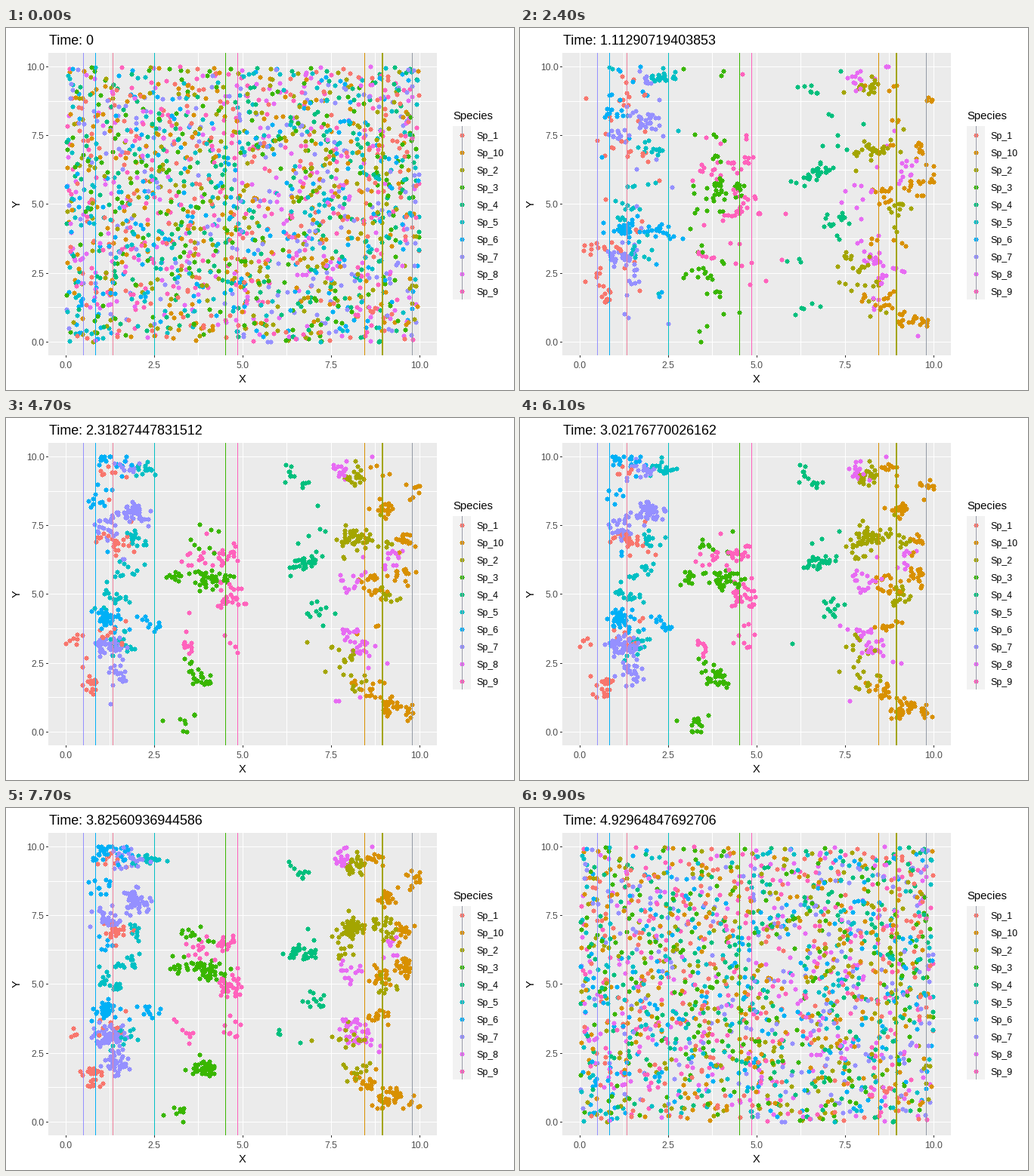
Write a matplotlib script that moves like this. It is 672 px wide and 480 px high and loops after 10 s.

```python
import numpy as np
import matplotlib.pyplot as plt
from matplotlib.animation import FuncAnimation
from matplotlib.patches import Rectangle

W, H, DPI, FRAMES = 672, 480, 96, 100
LEFT, RIGHT, TOP, BOTTOM = 56, 570, 33, 434

# name: (colour, niche centre, final count, hot spots)
SPECIES = {
    "Sp_1": ("#F8766D", 1.1, 75, [(.3, 3.1), (.7, 1.8), (1.15, 3.2), (1.2, 9.5), (1.35, 6.9)]),
    "Sp_10": ("#D89000", 9.1, 210, [(8.4, 1.5), (9.6, 5.7), (8.9, 5.3), (9.0, 8.1), (9.3, 7.0),
                                    (9.8, 8.8), (8.8, 9.5), (8.8, 3.8), (9.4, .9)]),
    "Sp_2": ("#A3A500", 8.3, 160, [(8.1, 1.8), (7.9, 6.2), (8.0, 7.0), (9.0, 7.1), (9.1, 5.0),
                                   (8.1, 3.0), (7.1, 3.1), (8.2, 9.5)]),
    "Sp_3": ("#39B600", 3.9, 125, [(3.7, 6.8), (4.1, 5.5), (3.3, 5.6), (3.2, .3), (3.8, 2.0)]),
    "Sp_4": ("#00BF7D", 6.7, 60, [(6.75, 6.2), (6.8, 7.0), (6.2, 3.0), (6.6, 9.1), (7.1, 4.5)]),
    "Sp_5": ("#00BFC4", 1.6, 85, [(1.3, 4.9), (1.9, 7.1), (1.7, 3.0), (1.9, 5.9), (2.4, 9.6)]),
    "Sp_6": ("#00B0F6", 1.5, 100, [(1.3, 9.9), (1.0, 8.6), (1.2, 4.1), (2.4, 3.9), (1.1, 6.5)]),
    "Sp_7": ("#9590FF", 1.5, 230, [(1.2, 3.1), (1.4, 2.1), (2.0, 7.9), (1.2, 7.2), (1.6, 9.5)]),
    "Sp_8": ("#E76BF3", 8.5, 90, [(7.9, 1.3), (8.0, 3.6), (8.2, 5.6), (7.8, 9.6), (9.2, 6.3),
                                  (8.6, 3.0)]),
    "Sp_9": ("#FF62BC", 4.5, 85, [(4.8, 3.5), (4.6, 6.5), (4.6, 5.0), (3.5, 6.2), (3.4, 3.4)]),
}
COLORS = np.array([s[0] for s in SPECIES.values()])
NICHE = np.array([s[1] for s in SPECIES.values()])
FINAL = np.array([s[2] for s in SPECIES.values()])
SPOTS = [np.array(s[3]) for s in SPECIES.values()]

# pixel column, width, colour
VLINES = [(102, 1, "#9590FF"), (118, 1, "#00B0F6"), (141, 1, "#EE7F9C"),
          (196, 1, "#00BFC4"), (290, 1, "#39B600"), (306, 1, "#FF62BC"),
          (474, 1, "#D89000"), (497, 2, "#A3A500"), (537, 1, "#959CA6")]

TIMES = np.interp(
    np.arange(FRAMES),
    [0, 1, 2, 3, 8, 24, 47, 61, 77, 99],
    [0, .000412873905116, .0506318274409, .0506318274409, .306832967568254,
     1.11290719403853, 2.31827447831512, 3.02176770026162,
     3.82560936944586, 4.92964847692706])


def px(x):
    return 79.3 + 46.77 * x


def py(y):
    return 416.2 - 36.45 * y


def heat(kind, pos):
    """Closeness of each point to its species' nearest hot spot, 0 to 1."""
    out = np.zeros(len(kind))
    for k, spots in enumerate(SPOTS):
        own = kind == k
        d2 = ((pos[own, None] - spots[None]) ** 2).sum(2).min(1)
        out[own] = np.exp(-d2 / .5)
    return out


def simulate():
    """Population (kind, position) for every step of the run."""
    rng = np.random.default_rng(12)
    kind = rng.permutation(np.repeat(np.arange(len(COLORS)), 205))
    pos = rng.uniform(0, 10, (len(kind), 2))
    states = [(kind, pos)]
    for n in range(1, FRAMES - 1):
        dt = TIMES[n] - TIMES[n - 1]
        if dt > 0:
            d = np.abs(pos[:, 0] - NICHE[kind])
            rate = .5 + .6 * d ** 4 + .9 * (1 - heat(kind, pos))
            alive = rng.random(len(kind)) < np.exp(-rate * dt)
            kind, pos = kind[alive], pos[alive]
            warm = heat(kind, pos) + .12
            goal = 68 + (FINAL - 68) * np.clip((n - 8) / 72, 0, 1.15)
            for k, spots in enumerate(SPOTS):
                own = np.flatnonzero(kind == k)
                births = max(0, int(goal[k]) - len(own))
                p = warm[own] / warm[own].sum()
                child = pos[rng.choice(own, births, p=p)] + rng.normal(0, .12, (births, 2))
                seeded = rng.random(births) < .2
                near = spots[rng.integers(len(spots), size=births)]
                near = near + rng.normal(0, .2, (births, 2))
                child[seeded] = near[seeded]
                kind = np.append(kind, np.full(births, k))
                pos = np.vstack([pos, np.clip(child, 0, 10)])
        states.append((kind, pos))
    states.append(states[0])
    return states


plt.rcParams["font.family"] = "Liberation Sans"
fig = plt.figure(figsize=(W / DPI, H / DPI), dpi=DPI, facecolor="white")
ax = fig.add_axes([0, 0, 1, 1])
ax.set_xlim(0, W)
ax.set_ylim(H, 0)
ax.axis("off")


def box(x, y, w, h, color, z=1):
    ax.add_patch(Rectangle((x, y), w, h, fc=color, lw=0, antialiased=False, zorder=z))


def label(x, y, text, pt, color="black", ha="center", **kw):
    kw.setdefault("va", "baseline")
    return ax.text(x, y, text, fontsize=pt, color=color, ha=ha, **kw)


def dots(xy, colors, z):
    return ax.scatter(*np.transpose(xy), s=(5.1 * 72 / DPI) ** 2, c=colors,
                      linewidths=0, antialiased=False, zorder=z)


def snap(pos):
    return np.floor(np.column_stack([px(pos[:, 0]), py(pos[:, 1])])) + .5


# panel, grid and axes
box(LEFT, TOP, RIGHT - LEFT, BOTTOM - TOP, "#EBEBEB")
for v in np.arange(0, 10.1, 1.25):
    box(int(px(v)), TOP, 1, BOTTOM - TOP, "white", 2)
    box(LEFT, int(py(v)), RIGHT - LEFT, 1, "white", 2)
for v in np.arange(0, 10.1, 2.5):
    box(int(px(v)), BOTTOM, 1, 3, "#333333")
    box(LEFT - 3, int(py(v)), 3, 1, "#333333")
    label(px(v), 451, f"{v:.1f}", 9.1, "#4D4D4D")
    label(50.5, py(v) + 4.5, f"{v:.1f}", 9.1, "#4D4D4D", "right")
for x, w, color in VLINES:
    box(x, TOP, w, BOTTOM - TOP, color, 5)
label(313, 470, "X", 11)
label(15, 233.5, "Y", 11, rotation=90, va="center")
title = label(57, 22, "", 13.4, ha="left")

# legend
label(591, 121, "Species", 11.2, ha="left")
box(591, 130, 24, 230, "#F2F2F2")
box(603, 130, 1, 230, "#9A9CAA", 5)
rows = 142.5 + 23 * np.arange(len(COLORS))
dots([(603.5, y) for y in rows], COLORS, 4)
for name, y in zip(SPECIES, rows):
    label(622, y + 4.5, name, 9.3, ha="left")

STATES = simulate()
points = dots(snap(STATES[0][1]), COLORS[STATES[0][0]], 4)


def update(n):
    kind, pos = STATES[n]
    points.set_offsets(snap(pos))
    points.set_facecolor(COLORS[kind])
    title.set_text(f"Time: {TIMES[n]:.15g}")
    return points, title


anim = FuncAnimation(fig, update, frames=FRAMES, interval=100, repeat=True,
                     repeat_delay=0, blit=False)
plt.show()
```
